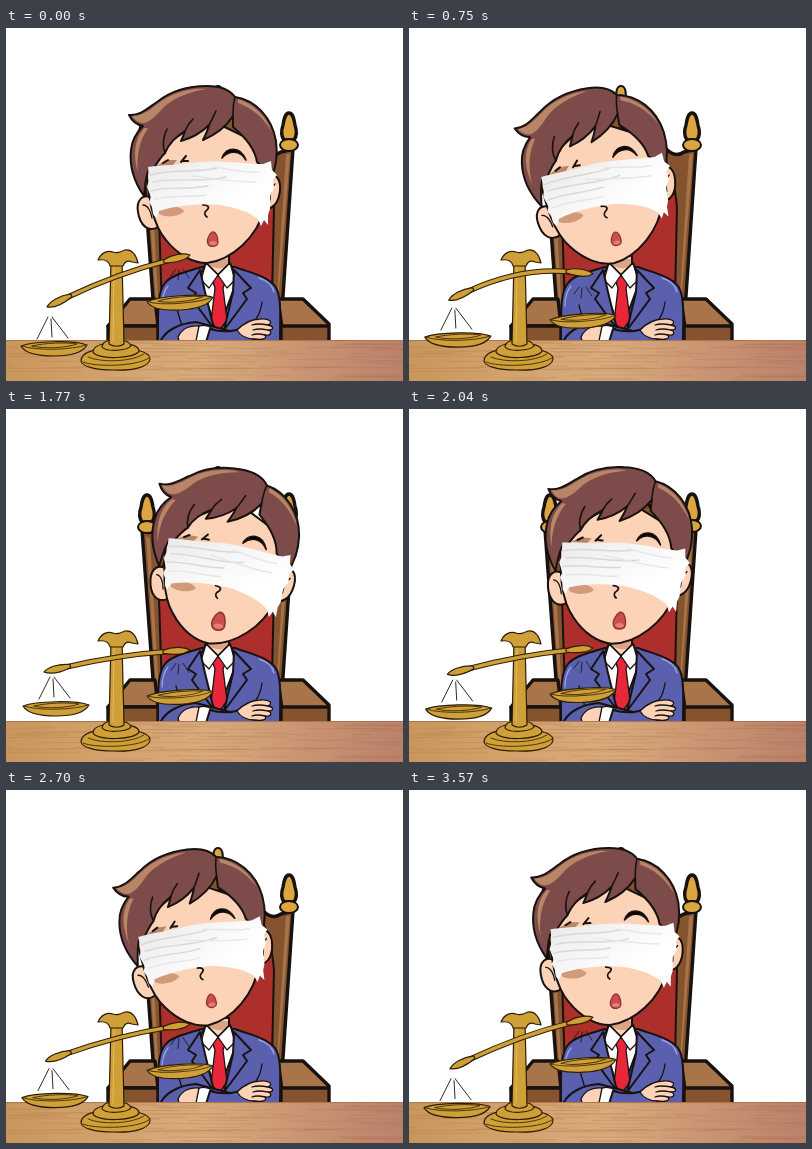
An HTML page that plays this animation: 397 px wide and 353 px high, repeating every 3600 ms.

```html
<!DOCTYPE html>
<html lang="en">
<head>
<meta charset="utf-8">
<title>Blindfolded judge</title>
<style>
html, body { margin: 0; width: 100%; height: 100%; overflow: hidden; background: #fff; }
svg { display: block; width: 397px; height: 353px; }
.ink { stroke: #17120f; stroke-width: 2; stroke-linejoin: round; stroke-linecap: round; }
.line { fill: none; }
.thick { stroke-width: 3.4; }
.thin { stroke-width: 1.3; }
.gold { fill: #cf9f38; stroke: #2d1d04; stroke-width: 1.2; stroke-linejoin: round; }
.shade { fill: none; stroke: #4d370c; stroke-width: 1; stroke-linecap: round; }
.shine { fill: none; stroke: #e4bb5a; stroke-width: 1; stroke-linecap: round; }
.wood { fill: #85542f; }
.lightwood { fill: #a8754a; }
.knob { fill: #dba640; }
.skin { fill: #fdd3b8; }
.suit { fill: #5a60ad; }
.hair { fill: #7d4b4a; }
.glow { fill: #b98567; }
</style>
</head>
<body>
<svg viewBox="0 0 397 353" xmlns="http://www.w3.org/2000/svg">
  <defs>
    <linearGradient id="desk">
      <stop offset="0" stop-color="#c9965c"/>
      <stop offset=".25" stop-color="#d3a26c"/>
      <stop offset=".5" stop-color="#d9ab7c"/>
      <stop offset=".75" stop-color="#c99472"/>
      <stop offset="1" stop-color="#bb826b"/>
    </linearGradient>
    <linearGradient id="cloth" x2=".7" y2=".6">
      <stop offset="0" stop-color="#e9e9e9"/>
      <stop offset=".5" stop-color="#f5f5f5"/>
      <stop offset="1" stop-color="#fff"/>
    </linearGradient>
    <g id="pan">
      <path class="gold" d="M-33 0C-29 7-18 10 0 10S29 6 33-1C20-6-20-5-33 0Z"/>
      <path class="shade" d="M-32 0C-18 5 18 4 32-1M-22 0C-10-3 12-4 23-2C12 2-10 3-22 0"/>
    </g>
    <g id="knob" class="ink">
      <path class="knob thick" d="M0-36C-4-36-5-30-6-24C-8-18-8-13-5-9H5C8-13 8-18 6-24C5-30 4-36 0-36Z"/>
      <ellipse class="knob" cy="-4" rx="9" ry="6"/>
    </g>
  </defs>

  <g id="chair">
    <path class="ink knob" d="M208 72C206 64 208 58 212 58S218 64 216 72Z"/>
    <path class="ink thick wood" d="M136 121C155 137 180 74 212 68C240 74 252 140 275 124L287 121L274 312H150Z"/>
    <path class="ink" fill="#ad2f2b" d="M153 190C155 130 180 104 212 100C246 104 264 130 268 180L265 312H157Z"/>
    <path class="lightwood" d="M280 126H284L272 275L269 300ZM140 127L144 130L153 285L151 295Z"/>
    <use href="#knob" x="141" y="122"/>
    <use href="#knob" x="283" y="121"/>
    <g class="ink">
      <path class="lightwood thick" d="M102 298L124 271H149L152 298Z"/>
      <path class="wood thick" d="M102 298H152V314H102Z"/>
      <path class="lightwood thick" d="M272 271H297L323 296L322 300H276Z"/>
      <path class="wood thick" d="M275 298H323V314H275Z"/>
    </g>
  </g>

  <g id="body" class="ink">
    <path class="suit" d="M196 239C180 244 165 247 159 255C151 265 152 282 152 314H274C274 290 276 268 269 258C261 248 245 245 229 239Z"/>
    <path class="skin" d="M199 228H223V242L212 250L200 242Z"/>
    <path fill="#dca486" stroke="none" d="M201 231H222V238C214 242 207 240 201 236Z"/>
    <path fill="#fff" d="M200 235L192 252L212 304L231 252L224 235L212 247Z"/>
    <path class="thin" fill="#e8283a" d="M209 248H217L219 255L217 260L221 292L213 303L205 294L209 260L207 254Z"/>
    <path class="thin" fill="#fff" d="M200 235L195 252L203 260L212 247L221 260L229 252L224 235L212 247Z"/>
    <path class="suit" d="M194 242L182 260L190 265L186 271L208 301L199 264Z"/>
    <path class="suit" d="M228 242L245 260L237 265L241 271L218 302L227 264Z"/>
    <path class="line thin" d="M170 277C172 286 174 291 176 298M256 274C255 282 253 287 250 291"/>
    <path class="line thin" style="stroke:#9aa2e4" d="M162 258C157 264 156 271 156 278M253 250C261 252 266 257 268 264"/>
    <path class="suit" d="M155 312C160 303 173 295 190 294L205 298L239 307L230 314H155Z"/>
    <path fill="#fff" class="thin" d="M191 299C197 296 203 298 207 301L201 314H188Z"/>
    <path class="suit" d="M204 301C217 305 230 303 239 299L250 314H200Z"/>
    <path class="skin thin" d="M231 302C237 296 244 291 254 291C263 290 268 294 262 297C268 298 268 302 262 302C267 304 265 308 259 307C262 311 255 312 249 311C241 311 235 309 231 302Z"/>
    <path class="line thin" d="M246 297C252 295 257 296 262 297M247 302C253 300 257 301 262 302M246 307C251 305 255 306 259 307"/>
    <path class="skin thin" d="M172 309C176 300 185 297 193 298L190 313H173Z"/>
  </g>

  <g id="head">
    <g class="ink">
      <path class="skin" d="M148 171C137 164 130 172 132 184C134 197 142 205 152 199Z"/>
      <path class="skin" d="M258 150C267 142 275 149 274 162C273 175 266 183 257 180Z"/>
      <path class="line thin" d="M137 177C142 177 145 184 146 190M269 156C265 159 264 166 264 172"/>
      <path class="skin" d="M139 130C143 175 147 197 160 212C172 227 187 235 201 235C226 232 251 209 258 182C263 162 264 140 262 120L200 90Z"/>
      <path class="hair" d="M123 87C134 88 142 80 151 74C166 62 183 58 201 58C214 58 224 62 229 69C249 72 266 89 270 113C272 128 270 140 265 150C261 144 257 140 251 134C249 121 239 109 227 99C227 95 227 92 227 88C220 99 209 107 197 112C200 106 202 102 203 97C196 104 186 110 175 113C177 109 178 106 179 103C169 109 163 115 159 125C155 129 151 135 148 140L143 141C139 150 139 160 138 168C129 155 123 139 125 122C126 111 131 104 137 98C131 97 126 93 123 87Z"/>
    </g>
    <path class="glow" d="M126 88C142 88 149 75 164 68C177 62 190 60 200 61C182 64 166 71 157 80C150 88 143 95 137 95C132 95 129 92 126 88Z"/>
    <path class="glow" d="M138 100C128 112 127 127 132 145C130 127 134 112 142 100ZM232 71C248 76 260 88 266 104C256 88 246 80 232 75Z"/>
    <path class="ink line" style="stroke-width:1.6" d="M229 69C227 75 227 81 227 88M203 97C206 92 208 87 210 83M179 103C181 98 184 94 187 91M159 125C156 117 157 109 161 101"/>
    <path class="ink" d="M216 130C220 119 234 117 240 132C234 122 223 122 216 130Z" style="stroke-width:1.6"/>
    <path class="glow" d="M150 138L160 132L171 132L167 137Z"/>
    <path class="ink line" d="M157 135L162 132M175 134L180 128M177 133H182"/>
    <path fill="#d09a7b" d="M153 180C161 176 174 178 178 183C174 189 159 190 153 186ZM235 177C246 175 254 180 258 186C249 187 239 184 235 177Z"/>
    <path fill="url(#cloth)" d="M142 139C156 137 176 137 193 134C216 132 240 136 257 136L265 133L266 142L271 147L267 152L268 160L264 168L264 181L262 187L262 197L258 192L255 198L252 191C242 183 230 180 215 177C195 175 171 177 153 183L150 190L147 186L146 179L143 174L145 169L141 159L143 152Z"/>
    <g fill="none" stroke="#d8d8d8" stroke-width="1.4" stroke-linecap="round">
      <path d="M144 147C166 141 190 145 212 140M147 154C168 149 196 155 220 149M145 163C160 158 181 162 202 158"/>
      <path stroke="#e6e6e6" d="M149 171C170 166 186 170 200 167M207 139C225 141 238 145 253 144M186 148C214 151 235 155 250 154"/>
    </g>
    <path class="ink line" style="stroke-width:1.7" d="M197 177C202 177 204 179 201 182C198 184 198 187 201 189"/>
    <g id="mouth">
      <path fill="#c9504f" stroke="#8b3434" stroke-width="1.2" d="M-1-7C3-8 5-2 5 3C5 8-3 9-5 5C-7 2-4-5-1-7Z"/>
      <path fill="#e77d78" d="M-4 4C-1 1 3 2 4 4C3 7-3 7-4 4Z"/>
    </g>
  </g>

  <rect y="312" width="397" height="41" fill="url(#desk)"/>
  <path d="M0 312.6H397" stroke="#a8744a" stroke-width="1"/>
  <path id="grain" fill="none" stroke="#96603a" stroke-opacity=".22" stroke-width=".8"/>

  <g id="scale">
    <path class="gold" d="M75 333C75 324 90 320 108 320S144 323 144 331C143 339 127 343 107 342C88 342 76 338 75 333Z"/>
    <path class="shade" d="M77 334C88 339 129 339 143 330M82 329C95 335 126 334 138 326"/>
    <path class="gold" d="M87 324C87 317 98 315 111 315S133 318 133 323C130 331 91 332 87 324Z"/>
    <path class="gold" d="M96 319C97 313 102 312 111 312S124 314 125 318C121 323 100 324 96 319Z"/>
    <path class="gold" d="M105 232L103 316C107 319 114 319 118 316L116 232Z"/>
    <path class="shine" d="M108 238L107 313"/>
    <path class="gold" d="M92 232C95 225 101 222 107 224C111 226 115 224 119 222C126 221 130 227 132 235L126 234C122 232 119 233 117 238L104 238C103 233 99 231 92 232Z"/>
    <path id="armEdge" fill="none" stroke="#2d1d04" stroke-width="5.4"/>
    <path id="arm" fill="none" stroke="#cf9f38" stroke-width="3.4"/>
    <g id="leftTip"><path class="gold" d="M0 0C5-4 16-5 27-1.5V1.5C17 4 6 4 0 0Z"/></g>
    <g id="rightTip"><path class="gold" d="M0 0C5-4 16-4 27-1.5V1.5C17 5 6 4 0 0Z"/></g>
    <g id="leftPan">
      <path class="ink line" style="stroke-width:.9" d="M-6-29L-17-7M-3-27L-2-9M-2-29L14-8"/>
      <use href="#pan"/>
    </g>
    <g id="rightPan">
      <path class="ink line" style="stroke-width:.8" d="M-4-31L-9-24M-1-30L-2-20M3-31L9-22"/>
      <use href="#pan" transform="rotate(-3)"/>
    </g>
  </g>
</svg>
<script>
const LOOP = 3600, STEP = 30;
const el = id => document.getElementById(id);
const put = (id, name, value) => el(id).setAttribute(name, value);

// Linear interpolation through values at the shared key times
const LEFT = 750, RIGHT = 1770, BACK = 2790;
function track(keys, t) {
  let i = 1;
  while (i < keys.length - 1 && t > keys[i][0]) i++;
  const [t0, a] = keys[i - 1], [t1, b] = keys[i];
  return a + (b - a) * (t - t0) / (t1 - t0);
}

const tilt = [[0, 0], [LEFT, -8.6], [RIGHT, 10.6], [BACK, -8.6], [LOOP, 0]];
const slide = [[0, 0], [LEFT, 2.5], [RIGHT, 3.5], [BACK, 0], [LOOP, 0]];
const talk = [[0, 1], [LEFT, .93], [RIGHT, 1.25], [BACK, .9], [LOOP, 1]];
const drop = [[0, 0], [LEFT, 19], [RIGHT, 14], [LOOP, 0]];
const rise = [[0, 0], [RIGHT, 1], [LOOP, 0]];

function drawGrain() {
  let seed = 7, d = "";
  const rnd = () => (seed = seed * 16807 % 2147483647) / 2147483647;
  for (let i = 0; i < 70; i++) {
    const w = 20 + rnd() * 70;
    d += `M${rnd() * 397 - 20} ${315 + rnd() * 37}q${w / 2} ${rnd() * 2 - 1} ${w} 0`;
  }
  put("grain", "d", d);
}

function placeTip(id, x, y, cx, cy) {
  const a = Math.atan2(cy - y, cx - x);
  put(id, "transform", `translate(${x} ${y}) rotate(${a * 180 / Math.PI})`);
  return [x + 22 * Math.cos(a), y + 22 * Math.sin(a)];
}

function draw(t) {
  const up = track(rise, t), down = track(drop, t);
  put("head", "transform", `translate(${track(slide, t)} 0) rotate(${track(tilt, t)} 203 226)`);
  put("mouth", "transform", `translate(207 211) scale(${track(talk, t)})`);

  const lx = 41 - 3 * up, ly = 279 - 16 * up, rx = 184, ry = 227 + down;
  const cx = 112, cy = 498 - (ly + ry) / 2;
  const a = placeTip("leftTip", lx, ly, cx, cy);
  const b = placeTip("rightTip", rx, ry, cx, cy);
  const d = `M${a}Q${cx} ${cy} ${b}`;
  put("armEdge", "d", d);
  put("arm", "d", d);
  put("leftPan", "transform", `translate(${48 + 2 * up} ${318 - 21 * up})`);
  put("rightPan", "transform", `translate(174 ${272 + down * .95})`);
}

const start = performance.now();
function tick() {
  const t = (performance.now() - start) % LOOP;
  draw(Math.floor(t / STEP) * STEP);
  requestAnimationFrame(tick);
}
drawGrain();
draw(0);
requestAnimationFrame(tick);
</script>
</body>
</html>
```
